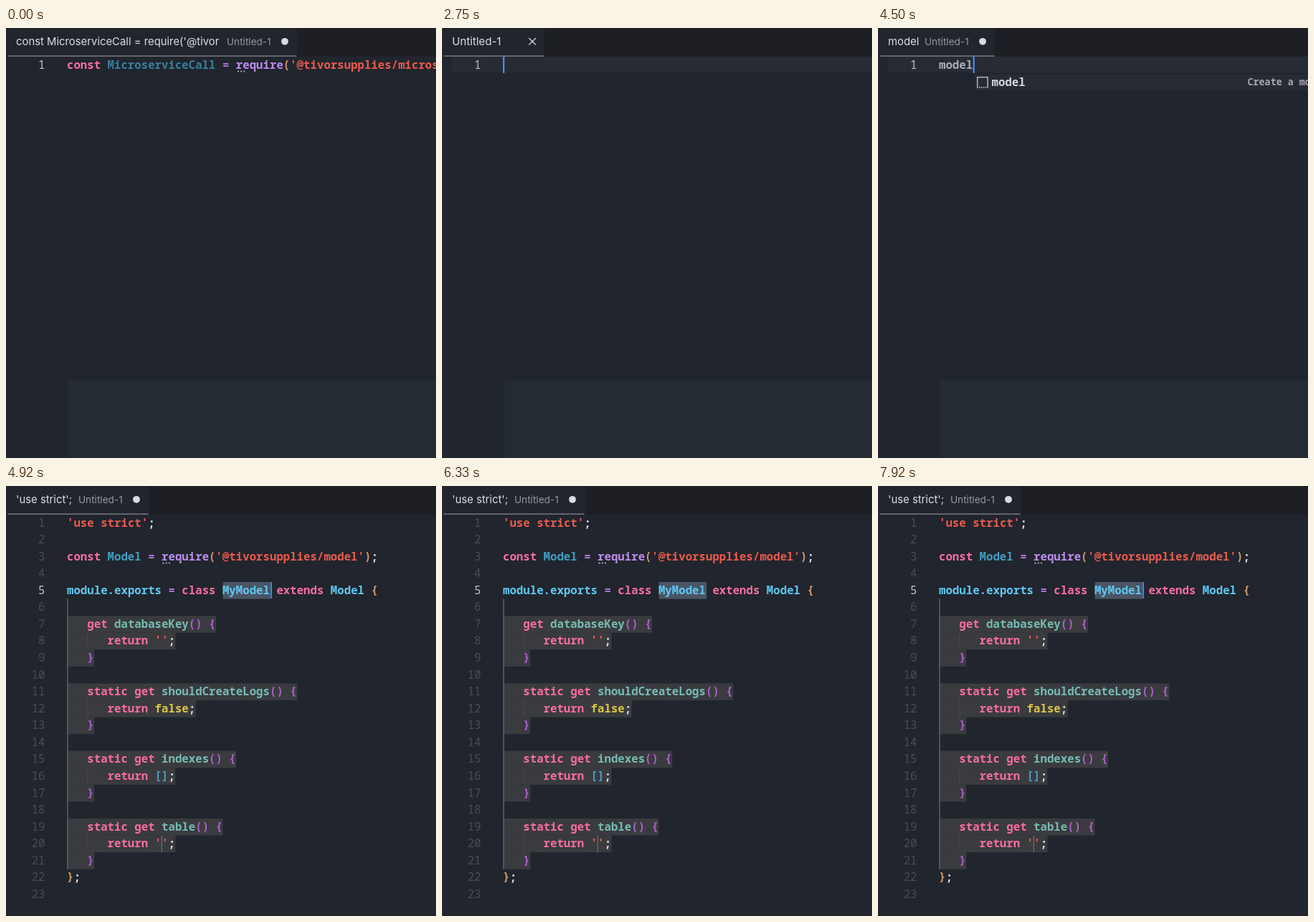
Write an HTML page that moves like this. It is 600x600 px and loops after 8 s.

```html
<!DOCTYPE html>
<html lang="en">
<head>
<meta charset="utf-8">
<title>Editor snippet</title>
<style>
  html, body { margin: 0; width: 100%; height: 100%; overflow: hidden; background: #21252d; }
  svg { display: block; width: 100vw; height: 100vh; }
  text { white-space: pre; }
  .code { font: 600 15.72px "Noto Sans Mono", "DejaVu Sans Mono", monospace; }
  .num { font-weight: 400; text-anchor: end; }
  .ui { font-family: Inter, "Open Sans", sans-serif; }
</style>
</head>
<body>
<svg id="stage" viewBox="0 0 600 600"></svg>
<script>
const LOOP = 8000, CLEAR = 80, BLINK = 580, TYPE = 3330, KEY = 180, INSERT = 4580;
const LEFT = 85, CHAR = 9.432, ROW = 23.57, TOP = 39.7;
const WORD = 'model';
const COLOR = {
  k: '#f76ea0', c: '#3f9dc0', b: '#5fc8f2', o: '#b274de', r: '#bd8cec', g: '#d3996a',
  s: '#ea5a4d', w: '#dde0e5', m: '#76bbb2', p: '#ae60cb', y: '#d9c545', a: '#4a9fc4',
  d: '#367f9d', t: '#a9aeb8'
};

// Each token: one colour letter, then its text
const getter = (head, value) => [head, `k      return |${value}|w;`, 'p   }'];
const REQUIRE = "kconst |dMicroserviceCall |o= |rrequire|g(|s'@tivorsupplies/microservice'|g)|w;";
const SNIPPET = [
  "s'use strict'|w;", '',
  "kconst |cModel |o= |rrequire|g(|s'@tivorsupplies/model'|g)|w;", '',
  'bmodule.exports |o= |kclass |bMyModel |kextends |bModel |g{', '',
  ...getter('k   get |mdatabaseKey|p() {', "s''"), '',
  ...getter('k   static get |mshouldCreateLogs|p() {', 'yfalse'), '',
  ...getter('k   static get |mindexes|p() {', 'a[]'), '',
  ...getter('k   static get |mtable|p() {', "s''"),
  'g}|w;', ''
];

const NS = 'http://www.w3.org/2000/svg';
const stage = document.getElementById('stage');

function add(parent, tag, attrs, text) {
  const el = document.createElementNS(NS, tag);
  for (const name in attrs) el.setAttribute(name, attrs[name]);
  if (text !== undefined) el.textContent = text;
  parent.appendChild(el);
  return el;
}
const group = (parent = stage) => add(parent, 'g', {});
const box = (parent, x, y, width, height, fill) => add(parent, 'rect', { x, y, width, height, fill });
const set = (el, attrs) => { for (const name in attrs) el.setAttribute(name, attrs[name]); };
const show = (el, on) => el.setAttribute('visibility', on ? 'visible' : 'hidden');
const colX = col => LEFT + col * CHAR;
const rowY = row => TOP + row * ROW;

function codeLine(parent, row, line) {
  let col = 0;
  if (!line) return col;
  for (const token of line.split('|')) {
    const body = token.slice(1), lead = body.length - body.trimStart().length;
    add(parent, 'text', {
      class: 'code', x: colX(col + lead), y: rowY(row) + 16.8, fill: COLOR[token[0]],
      'font-weight': 600
    }, body.trim());
    col += body.length;
  }
  return col;
}

function lineNumber(parent, row, active) {
  add(parent, 'text', {
    class: 'code num', x: 54.5, y: rowY(row) + 16.8, fill: active ? '#bfc3c9' : '#484d57'
  }, row + 1);
}

function hintDots(parent, x, y) {
  for (let i = 0; i < 3; i++) box(parent, x + i * 4.2, y, 2, 2, '#a4a8b0');
}

box(stage, 0, 0, 600, 600, '#21252d');

// Tab strip
box(stage, 0, 0, 600, 39.5, '#1d1f24');
const tabBack = box(stage, 0, 0, 143, 39.5, '#22252d');
const tabLine = box(stage, 2, 38.5, 140, 1.2, '#8c8f94');
const title = add(stage, 'text', { class: 'ui', x: 14, y: 24.3, fill: '#dcdee2' });
const subtitle = add(stage, 'text', { class: 'ui', y: 24.3, 'font-size': 13.6, fill: '#9699a0' }, 'Untitled-1');
const dirty = add(stage, 'circle', { cy: 18.8, r: 4.9, fill: '#d9dbde' });
const closer = add(stage, 'path', { d: 'M121.3 14l9.6 9.6M130.9 14l-9.6 9.6', stroke: '#d0d3d7', 'stroke-width': 1.4 });

// One-line views
const short = group();
box(short, 87, 491, 513, 109, '#252b33');
const rowBack = box(short, 14, 40, 586, 22.6, '#262b34');
lineNumber(short, 0, true);

const first = group();
codeLine(first, 0, REQUIRE);
hintDots(first, 323, 59.5);

const dot = box(stage, 89.5, 59, 2, 2, '#8d929b');
const typed = add(stage, 'text', { class: 'code', x: LEFT, y: rowY(0) + 16.8, fill: COLOR.t });

// Suggestion popup
const popup = group();
box(popup, 133, 63.5, 467, 25.5, '#1d2026');
box(popup, 134.5, 64.5, 466, 23.3, '#272b34');
add(popup, 'path', { d: 'M138.7 82V68.7H153V82', fill: 'none', stroke: '#c8cbd0', 'stroke-width': 1.3 });
add(popup, 'path', { d: 'M138 83H154', stroke: '#c8cbd0', 'stroke-width': 1.5, 'stroke-dasharray': '1.6 1.3' });
add(popup, 'text', { class: 'code', x: 158.5, y: 81.2, fill: '#d3d6da', style: 'font-weight:700' }, WORD);
add(popup, 'text', { class: 'code', x: 515.5, y: 80.4, fill: '#a3a7ad', style: 'font-size:13.4px' }, 'Create a model');

// Expanded snippet
const full = group(), marks = group(full);
SNIPPET.forEach((line, row) => {
  lineNumber(full, row, row === 4);
  const cols = codeLine(full, row, line);
  if (row > 4 && row < 21 && cols) {
    box(marks, 86, rowY(row), cols * CHAR - 0.5, ROW, '#3a3b3f');
    if (line.includes('return')) {
      add(marks, 'path', {
        d: `M114 ${rowY(row)}v${ROW}`, stroke: '#55575c', 'stroke-width': 1, 'stroke-dasharray': '2 2'
      });
    }
  }
});
box(marks, 85.3, rowY(5), 1.3, ROW * 16, '#696c71');
box(marks, colX(23) + 0.8, rowY(4), 7 * CHAR + 0.5, ROW, '#4a5565');
box(marks, 216.8, rowY(19), 1, ROW, '#77797e');
hintDots(full, 218.5, 106.5);

const cursor = box(stage, 85, 40, 2.2, 22.8, '#4f8cf2');

function setTab(text, subX) {
  const plain = subX === 0, end = plain ? 142 : subX + 97.5;
  title.textContent = text;
  set(title, { 'font-size': plain ? 15.1 : 14.85 });
  set(subtitle, { x: subX });
  set(dirty, { cx: subX + 81 });
  set(tabBack, { width: end + 1 });
  set(tabLine, { width: end - 2 });
  show(subtitle, !plain);
  show(dirty, !plain);
  show(closer, plain);
}

function draw(t) {
  const filled = t < CLEAR, done = t >= INSERT;
  const count = t < TYPE || done ? 0 : Math.min(WORD.length, Math.floor((t - TYPE) / KEY) + 1);
  const word = WORD.slice(0, count);

  if (filled) setTab("const MicroserviceCall = require('@tivor", 308);
  else if (done) setTab("'use strict';", 101);
  else if (count) setTab(word, count < 5 ? 25 + 9 * count : 65);
  else setTab('Untitled-1', 0);

  show(short, !done);
  show(rowBack, !filled && !done);
  show(first, filled);
  show(dot, !filled && t < 1250);
  show(popup, count > 0);
  show(full, done);
  typed.textContent = word;

  // The cursor stays lit for half a second after each key, then blinks
  let since = t - BLINK;
  if (done) since = t - INSERT;
  else if (count) since = t - TYPE - (count - 1) * KEY;
  const lit = since < 0 || since % 1000 < 500;
  show(cursor, !filled && lit);
  if (done) set(cursor, { x: 369.3, y: rowY(4), width: 1.8 });
  else set(cursor, { x: count ? colX(count) + 0.4 : 85, y: 40, width: 2.2 });
}

const start = performance.now();
function tick() {
  draw((performance.now() - start) % LOOP);
  requestAnimationFrame(tick);
}
tick();
</script>
</body>
</html>
```
